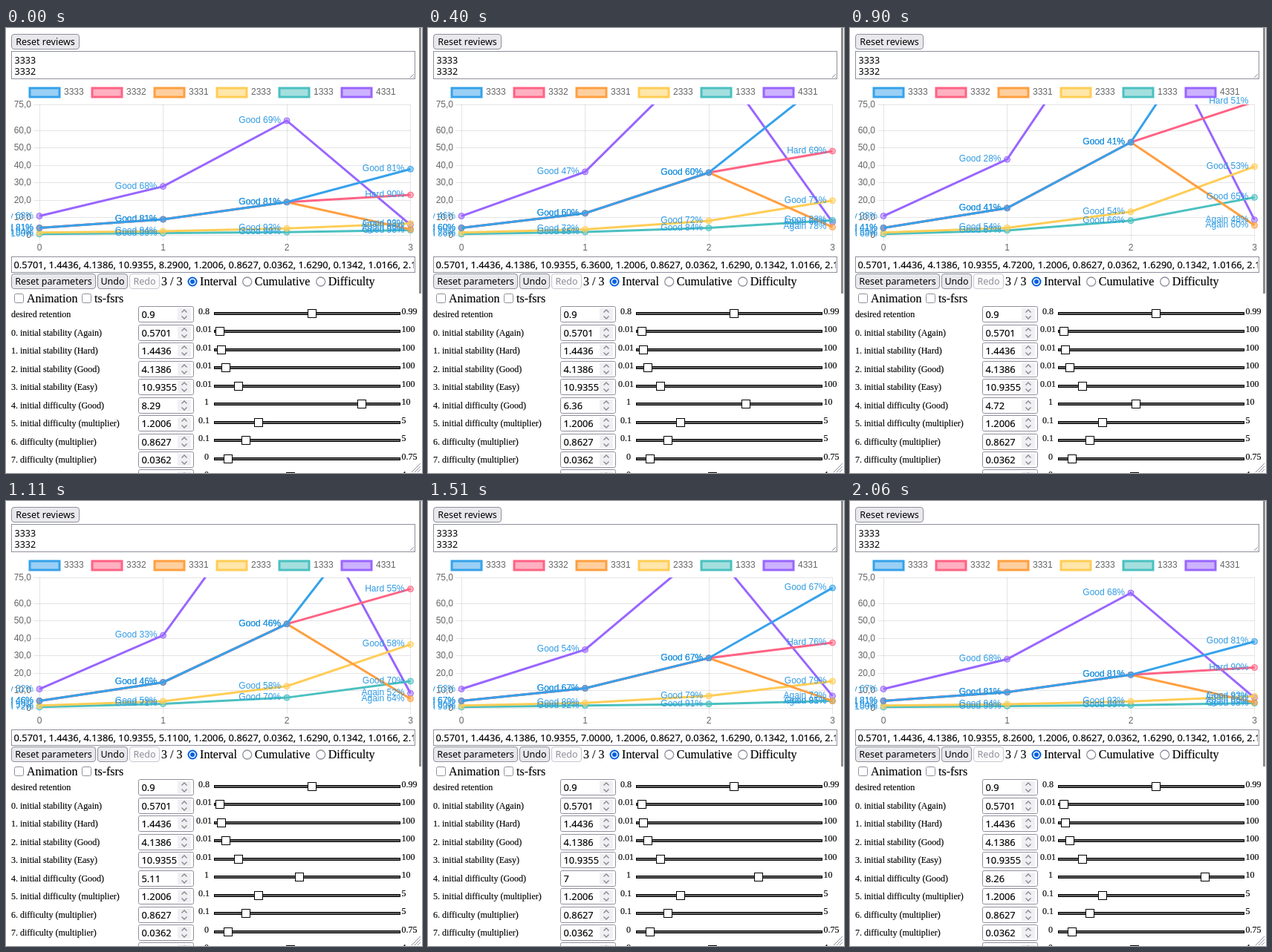
An HTML page with a canvas for the animation above (2.11 s loop, 560x600 px).

```html
<!DOCTYPE html>
<html lang="en">
<head>
<meta charset="utf-8">
<title>Scheduler parameters</title>
<style>
  html, body { margin: 0; width: 560px; height: 600px; overflow: hidden; background: #fff; }
  svg, canvas { position: absolute; left: 0; top: 0; display: block; }
  canvas { left: 7px; top: 71px; width: 544px; height: 231px; }
  .ui { font: 12.5px "Noto Sans", "Open Sans", sans-serif; }
  .num { font: 12.85px "Noto Sans", "Open Sans", sans-serif; }
  .serif { font: 16px "Liberation Serif", serif; }
  .small { font: 12px "Liberation Serif", serif; }
  .serif, .small, .num { stroke: #000; stroke-width: 0.15px; }
  .field { fill: #fff; stroke: #8f8f9d; }
  .button { fill: #e9e9ed; stroke: #8f8f9d; }
  .off { fill: #fbfbfc; stroke: #c9c9d0; }
  .stroke { fill: none; stroke: #8f8f9d; }
  .thumb { fill: #fff; stroke: #000; }
</style>
</head>
<body>
<svg id="ui" width="560" height="600" viewBox="0 0 560 600"></svg>
<canvas id="chart"></canvas>
<script>
const LOOP = 2110;
// Scheduler weights; entry 4 follows the dragged slider.
const W = [0.5701, 1.4436, 4.1386, 10.9355, 8.29, 1.2006, 0.8627, 0.0362, 1.629,
           0.1342, 1.0166, 2.1174, 0.0839, 0.3204, 1.4676, 0.219, 2.8237];
const GRADES = ['', 'Again', 'Hard', 'Good', 'Easy'];
const SERIES = [
  ['3333', '54,162,235'], ['3332', '255,99,132'], ['3331', '255,159,64'],
  ['2333', '255,205,86'], ['1333', '75,192,192'], ['4331', '153,102,255']
];
// Drag phase in degrees at given times.
const PHASE = [[0, 0], [400, 94.66], [700, 137.9], [1110, 218.6],
               [1360, 266.63], [1760, 318.4], [2060, 349.5], [2110, 360]];

/* ---------- controls ---------- */

const box = (cls, x, y, w, h, r = 0) =>
  `<rect class="${cls}" x="${x}" y="${y}" width="${w}" height="${h}" rx="${r}"/>`;
const label = (cls, x, y, str, extra = '') =>
  `<text class="${cls}" x="${x}" y="${y}" ${extra}>${str}</text>`;
const button = (x, y, w, str, off) =>
  box(off ? 'off' : 'button', x, y, w, 20, 3.5) +
  label('ui', x + w / 2, y + 14.5, str, `text-anchor="middle" fill="${off ? '#8f8f99' : '#000'}"`);
const radio = (x, str, on) =>
  (on ? `<circle cx="${x}" cy="342" r="5.5" fill="#fff" stroke="#0060df" stroke-width="2"/>
         <circle cx="${x}" cy="342" r="3" fill="#0060df"/>`
      : `<circle class="field" cx="${x}" cy="342" r="6" stroke-width="1.3"/>`) +
  label('serif', x + 10.1, 347, str);
const checkbox = (x, str) =>
  box('stroke', x, 358.5, 12, 12, 2) + label('serif', x + 16.5, 369.5, str);
const grip = (x, y, n) => {
  let d = '';
  for (let s = n; s > 0; s -= 4) d += `M${x - s} ${y}L${x} ${y - s}`;
  return `<path class="stroke" d="${d}"/>`;
};

// text, value, min, max, min label x, thumb centre
const ROWS = [
  ['desired retention', '0.9', '0.8', '0.99', 259, 412],
  ['0. initial stability (Again)', W[0], '0.01', '100', 256, 288],
  ['1. initial stability (Hard)', W[1], '0.01', '100', 256, 290],
  ['2. initial stability (Good)', W[2], '0.01', '100', 256, 296],
  ['3. initial stability (Easy)', W[3], '0.01', '100', 256, 313],
  ['4. initial difficulty (Good)', W[4], '1', '10', 267, 479],
  ['5. initial difficulty (multiplier)', W[5], '0.1', '5', 259, 340],
  ['6. difficulty (multiplier)', W[6], '0.1', '5', 259, 323],
  ['7. difficulty (multiplier)', W[7], '0', '0.75', 267, 299],
  ['', '', '0', '4', 267, 383]
];

function row([text, value, min, max, minX, thumb], i) {
  const y = Math.round(386.4 + 24.45 * i), mid = Math.round(384.9 + 24.45 * i);
  const top = y - 10.5, dragged = i === 5;
  return label('small', 7, y + 4, text) +
    box('field', 178.5, top, 74, 21, 2) +
    `<rect x="231" y="${top + 2.5}" width="18" height="16" fill="#f0f0f3"/>` +
    `<path d="M236.5 ${top + 8}l3.5 -3.5 3.5 3.5m-7 5l3.5 3.5 3.5 -3.5" fill="none" stroke="#85858f" stroke-width="1.3"/>` +
    label('num', 182.5, top + 15.8, value, dragged ? 'id="value"' : '') +
    label('small', minX, mid + 1, min) + label('small', 532.5, mid + 1, max) +
    `<rect x="280" y="${mid - 2}" width="251" height="4"/>` +
    `<rect x="281" y="${mid - 0.5}" width="249" height="1" fill="#bbb"/>` +
    `<rect ${dragged ? 'id="thumb"' : ''} class="thumb" x="${thumb - 5.5}" y="${mid - 5.5}" width="11" height="11"/>`;
}

document.getElementById('ui').innerHTML =
  '<clipPath id="inner"><rect x="9" y="310" width="540" height="19"/></clipPath>' +
  button(7.5, 8.5, 91, 'Reset reviews') +
  box('field', 7.5, 31.5, 543, 37) +
  label('ui', 11.5, 47.5, '3333') + label('ui', 11.5, 62.5, '3332') + grip(549, 67, 5) +
  box('field', 7.5, 308.5, 543, 21) +
  `<g clip-path="url(#inner)">${label('num', 10.5, 324, '', 'id="list"')}</g>` +
  button(7.5, 331.5, 113, 'Reset parameters') +
  button(123.5, 331.5, 40, 'Undo') + button(166.5, 331.5, 40, 'Redo', true) +
  label('serif', 209, 347, '3 / 3') +
  radio(251, 'Interval', true) + radio(324.7, 'Cumulative') + radio(423.7, 'Difficulty') +
  checkbox(11.5, 'Animation') + checkbox(102.5, 'ts-fsrs') +
  ROWS.map(row).join('') +
  '<rect x="556" y="0" width="3" height="358" fill="#8c8c8c"/>' + grip(558, 599, 12);

const valueText = document.getElementById('value');
const listText = document.getElementById('list');
const thumbBox = document.getElementById('thumb');

/* ---------- scheduler ---------- */

const clampD = d => Math.min(10, Math.max(1, d));

function simulate(grades) {
  let s, d;
  return [...grades].map((c, i) => {
    const g = +c;
    if (i === 0) {
      s = W[g - 1];
      d = clampD(W[4] - W[5] * (g - 3));
    } else {
      const days = Math.max(1, Math.round(s));
      const lapse = 1 - (1 + 19 / 81 * days / s) ** -0.5;
      if (g === 1) {
        s = W[11] * d ** -W[12] * ((s + 1) ** W[13] - 1) * Math.exp(W[14] * lapse);
      } else {
        const gain = Math.exp(W[8]) * (11 - d) * s ** -W[9] * (Math.exp(W[10] * lapse) - 1);
        s *= 1 + gain * (g === 2 ? W[15] : 1);
      }
      d = clampD(W[7] * W[4] + (1 - W[7]) * (d - W[6] * (g - 3)));
    }
    return { s, text: `${GRADES[g]} ${Math.round((d - 1) / 9 * 100)}%` };
  });
}

/* ---------- chart ---------- */

const canvas = document.getElementById('chart');
const ctx = canvas.getContext('2d');
const ratio = window.devicePixelRatio || 1;
canvas.width = 544 * ratio;
canvas.height = 231 * ratio;

const LEFT = 45, RIGHT = 544.5, TOP = 103.2, BOTTOM = 279.2;
const px = i => LEFT + (RIGHT - LEFT) / 3 * i;
const py = v => BOTTOM - (BOTTOM - TOP) * v / 75;

function segment(x1, y1, x2, y2) {
  ctx.beginPath();
  ctx.moveTo(x1, y1);
  ctx.lineTo(x2, y2);
  ctx.stroke();
}

function drawAxes() {
  ctx.lineWidth = 1;
  ctx.strokeStyle = 'rgba(0,0,0,0.1)';
  ctx.fillStyle = '#666';
  ctx.textAlign = 'right';
  for (const v of [0, 10, 20, 30, 40, 50, 60, 75]) {
    const y = Math.floor(py(v)) + 0.5;
    segment(LEFT - 8, y, RIGHT, y);
    ctx.fillText(v ? v + ',0' : '0', LEFT - 11, y);
  }
  ctx.textAlign = 'center';
  for (let i = 0; i < 4; i++) {
    const x = Math.floor(px(i)) + 0.5;
    segment(x, TOP, x, BOTTOM + 8);
    ctx.fillText(i, px(i), 297);
  }
}

function drawLegend() {
  ctx.lineWidth = 3;
  ctx.textAlign = 'left';
  SERIES.forEach(([name, rgb], i) => {
    const x = 32 + 84 * i;
    ctx.fillStyle = `rgba(${rgb},0.5)`;
    ctx.strokeStyle = `rgb(${rgb})`;
    ctx.fillRect(x, 81, 40, 12);
    ctx.strokeRect(x, 81, 40, 12);
    ctx.fillStyle = '#666';
    ctx.fillText(name, x + 46, 86.5);
  });
}

function drawSeries(points, rgb) {
  ctx.lineWidth = 3;
  ctx.strokeStyle = `rgb(${rgb})`;
  ctx.fillStyle = `rgba(${rgb},0.5)`;
  ctx.save();
  ctx.beginPath();
  ctx.rect(LEFT - 2, TOP - 0.2, RIGHT - LEFT + 4, BOTTOM - TOP + 2);
  ctx.clip();
  ctx.beginPath();
  points.forEach((p, i) => ctx.lineTo(px(i), py(p.s)));
  ctx.stroke();
  ctx.restore();
  ctx.lineWidth = 1;
  points.forEach((p, i) => {
    if (p.s > 75) return;
    ctx.beginPath();
    ctx.arc(px(i), py(p.s), 4, 0, 2 * Math.PI);
    ctx.fill();
    ctx.stroke();
  });
}

function drawChart() {
  ctx.setTransform(ratio, 0, 0, ratio, -7 * ratio, -71 * ratio);
  ctx.clearRect(7, 71, 544, 231);
  ctx.font = '12px "Liberation Sans", Arial, sans-serif';
  ctx.textBaseline = 'middle';
  drawAxes();
  drawLegend();
  const runs = SERIES.map(([name]) => simulate(name));
  for (let k = runs.length - 1; k >= 0; k--) drawSeries(runs[k], SERIES[k][1]);
  ctx.fillStyle = '#309be2';
  ctx.textAlign = 'right';
  for (const run of runs) {
    run.forEach((p, i) => ctx.fillText(p.text, px(i) - 8, py(p.s) - 0.3));
  }
}

/* ---------- timing ---------- */

// The drag advances in 50 ms steps, with one step of 60 ms.
const snap = t => t < 1110
  ? Math.min(1050, Math.floor(t / 50) * 50)
  : Math.floor((t - 10) / 50) * 50 + 10;

function difficultyAt(t) {
  const k = PHASE.findIndex(([end]) => t < end);
  const [t0, a] = PHASE[k - 1], [t1, b] = PHASE[k];
  const angle = a + (b - a) * (t - t0) / (t1 - t0);
  return Math.round(100 * (6.505 + 1.785 * Math.cos(angle * Math.PI / 180))) / 100;
}

let shown = -1;
function tick(now) {
  const t = snap(now % LOOP);
  if (t !== shown) {
    shown = t;
    W[4] = difficultyAt(t);
    valueText.textContent = W[4];
    listText.textContent = W.map(w => w.toFixed(4)).join(', ');
    thumbBox.setAttribute('x', Math.round(286.5 + (W[4] - 1) * 26.44) - 5.5);
    drawChart();
  }
  requestAnimationFrame(tick);
}
tick(performance.now());
</script>
</body>
</html>
```
